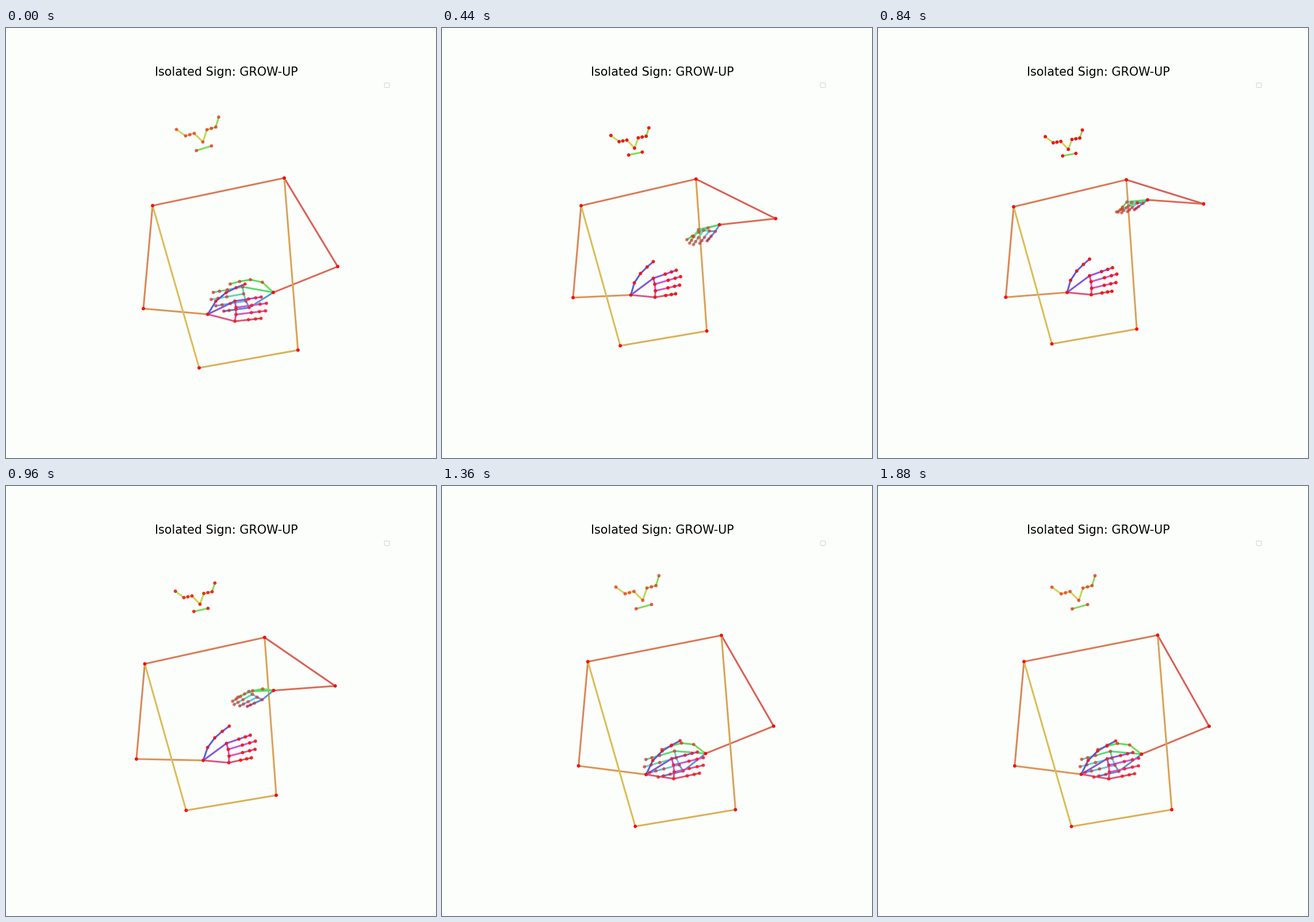
A matplotlib script that plays this animation: 748x748 px, repeating every 1.92 s.

```python
import colorsys

import matplotlib.pyplot as plt
import numpy as np
from matplotlib.animation import FuncAnimation
from matplotlib.collections import LineCollection
from matplotlib.patches import FancyBboxPatch

SIZE, FRAMES, STEP = 748, 48, 40
DPI = SIZE / 9
RED = (0.95, 0.07, 0.07)

# Start, lifting, raised, end of hold, lowered, settled.
TIMES = np.array([0, 240, 560, 840, 1120, 1440], float)


def pchip(keys):
    """Smooth path through the keys that never overshoots a held pose."""
    keys = np.array(keys, float)
    gap = np.diff(TIMES).reshape((-1,) + (1,) * (keys.ndim - 1))
    rate = np.diff(keys, axis=0) / gap
    a, b = rate[:-1], rate[1:]
    same = a * b > 0
    mid = np.where(same, 2 * a * b / np.where(same, a + b, 1), 0)
    slope = np.concatenate([rate[:1], mid, 0 * rate[:1]])

    def at(t):
        t = min(t, TIMES[-1])
        i = min(np.searchsorted(TIMES, t, "right") - 1, len(TIMES) - 2)
        h = TIMES[i + 1] - TIMES[i]
        u = (t - TIMES[i]) / h
        ease = u * u * (3 - 2 * u)
        return (keys[i] * (1 - ease) + keys[i + 1] * ease
                + h * u * (1 - u) * ((1 - u) * slope[i] - u * slope[i + 1]))
    return at


# Screen paths; right and left are as seen by the viewer.
shoulder_r = pchip([(484, 261), (470, 258), (432, 265), (432, 264), (480, 262.5), (486.5, 259.5)])
shoulder_l = pchip([(255, 309), (253, 305), (237, 311), (236, 311), (251, 306.5), (254, 305.5)])
elbow_r = pchip([(577, 415), (575, 395), (568, 307), (566.5, 306), (582, 414), (576, 418)])
wrist_r = pchip([(465, 460), (500, 441), (473, 301), (469, 299), (461, 450), (458.3, 466.5)])
wrist_l = pchip([(351, 498), (338, 480), (326, 460), (329, 460), (363, 504), (353.5, 501.5)])
ear_l = pchip([(296.5, 176.5), (297, 179), (292, 190), (291, 189), (301, 174.5), (302.5, 176)])
ear_r = pchip([(370, 155), (367.5, 160.5), (356.5, 178.5), (355.5, 177.5), (376, 156), (377.5, 156)])
lift = pchip([0, 0.6, 1, 1, 0, 0])
turn = pchip([5, 0, 0, 0, -5, 0])

# Hand shapes from the wrist: thumb base and tip, index and little
# knuckle, index and little fingertip.
FLAT = [(-20.5, -16), (-76, -8), (-54, -5), (-39.5, 30), (-104, 9), (-83, 40)]
DROOP = [(-24, 7), (-66, 37), (-39, 19), (-5, 26), (-57, 56), (-18, 52)]
CURL = [(-18, 5), (-54, 21), (-36, 3.5), (-8, 6), (-51, 21), (-23, 17)]
OPEN = [(12, -24), (60, -58), (45, -27), (48, 8), (90, -38), (93, -1)]
RAISED = [(6, -21), (39, -58), (39, -29), (42, 4), (79, -43), (78, -2)]
shape_r = pchip([FLAT, DROOP, CURL, CURL, FLAT, FLAT])
shape_l = pchip([OPEN, RAISED, RAISED, RAISED, OPEN, OPEN])

# Nose, eyes, mouth and ears in the frame (ear to ear, ears to nose).
EYES = (-0.34, -0.24, -0.135, 0.165, 0.27, 0.375)
FACE = np.array([(0, 0), *((x, -0.55) for x in EYES),
                 (0.165, 0.32), (-0.195, 0.33), (-0.5, -1), (0.5, -1)])


def torso(t):
    sr, sl, er = shoulder_r(t), shoulder_l(t), elbow_r(t)
    w = sr[0] - sl[0]
    # The lifting elbow swings outwards.
    er[0] += 11 * np.sin(np.pi * np.clip((t - 240) / 320, 0, 1))
    el = sl + (-0.07 * w, 0.66 * w + 28)
    hip_r = sr + (0.176 * w - 16.4, 1.2 * w + 24.5)
    hip_l = sl + (0.441 * w - 20, 1.324 * w - 21)
    return [sr, sl, er, el, hip_r, hip_l]


def face(t):
    left, right = ear_l(t), ear_r(t)
    across = right - left
    down = np.hypot(*across) * np.array([0.12, 0.425])
    nose = (left + right) / 2 + down
    return nose + FACE @ np.array([across, down])


def hand(wrist, shape, angle):
    base, tip, *corners = shape
    pts = [np.zeros(2)]
    for u in (0, 0.52, 0.8, 1):
        pts.append(base * ((1 - u) ** 2 + 3.2 * u * (1 - u)) + tip * u * u)
    k0, k1, t0, t1 = corners
    for i, grow in enumerate((1, 1.16, 1.13, 1)):
        knuckle = k0 + (k1 - k0) * i / 3
        reach = (t0 + (t1 - t0) * i / 3 - knuckle) * grow
        if 0 < i < 3:
            knuckle = knuckle * 1.04
        pts += [knuckle + reach * u for u in (0, 0.52, 0.79, 1)]
    c, s = np.cos(np.radians(angle)), np.sin(np.radians(angle))
    return wrist + np.array(pts) @ np.array([[c, s], [-s, c]])


def skeleton(t):
    return np.vstack([torso(t), face(t),
                      hand(wrist_r(t), shape_r(t), turn(t)),
                      hand(wrist_l(t), shape_l(t), turn(t))])


def chain(*ids):
    return list(zip(ids, ids[1:]))


R, L, COUNT = 17, 38, 59
PALM = (chain(0, 1, 2, 3, 4) + chain(0, 5, 6, 7, 8) + chain(5, 9, 10, 11, 12)
        + chain(9, 13, 14, 15, 16) + chain(13, 17) + chain(0, 17, 18, 19, 20))
BONES = (chain(0, 2, R) + chain(0, 1, 3, L) + chain(0, 4, 5, 1)
         + chain(6, 9, 8, 7, 15) + chain(6, 10, 11, 12, 16) + chain(13, 14))
BONES = np.array(BONES + [(a + w, b + w) for w in (R, L) for a, b in PALM])
COLORS = [colorsys.hls_to_rgb(0.01 + i / len(BONES), 0.6, 0.65)
          for i in range(len(BONES))]

fig = plt.figure(figsize=(9, 9), dpi=DPI, facecolor="#fcfefb")
ax = fig.add_axes([0, 0, 1, 1])
ax.set_xlim(0, SIZE)
ax.set_ylim(SIZE, 0)
ax.axis("off")
ax.text(383.35, 82.85, "Isolated Sign: GROW-UP", family="DejaVu Sans",
        size=18, ha="center", va="baseline", color="black")
ax.add_patch(FancyBboxPatch((658.2, 95.6), 8.8, 8, lw=1, fc="white", ec="#cccccc",
                            alpha=0.8, boxstyle="round,pad=0,rounding_size=2"))

lines = LineCollection([], colors=COLORS, linewidths=2.65, capstyle="round", zorder=2)
ax.add_collection(lines)
dots = ax.scatter(np.zeros(COUNT), np.zeros(COUNT), s=27, linewidths=0, zorder=3)


def draw(n):
    t = n * STEP
    pts = skeleton(t)
    lines.set_segments(pts[BONES])
    dots.set_offsets(pts)
    # Dots further from the viewer are fainter.
    up = lift(t)
    alpha = np.ones(COUNT)
    alpha[6:R] = 0.63 + 0.35 * up
    alpha[R + 1:L] = 0.6 - 0.08 * up
    alpha[L + 1:] = 0.72 + 0.2 * up
    dots.set_facecolors([RED + (a,) for a in alpha])
    return lines, dots


anim = FuncAnimation(fig, draw, frames=FRAMES, interval=STEP, repeat=True,
                     repeat_delay=0, blit=False)
plt.show()
```
